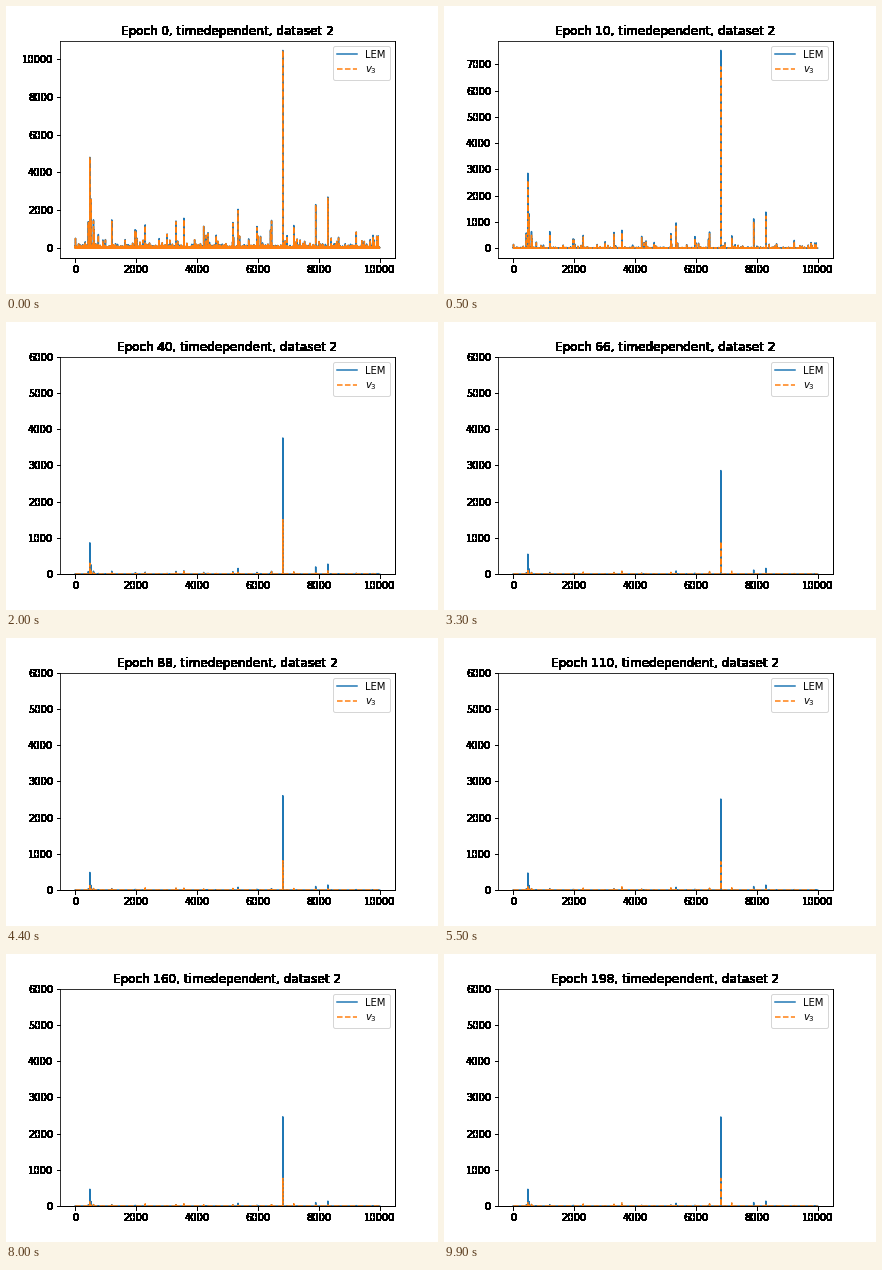
These frames come from a looping animation (432 px wide and 288 px high, 10 s). A matplotlib script:

```python
import numpy as np
import matplotlib.pyplot as plt
from matplotlib.animation import FuncAnimation

FRAMES, N = 100, 10000
TOP = 10450
TALL = {480: 4800, 520: 2600, 5350: 2050, 6820: TOP, 7900: 2300, 8300: 2700}
MID = [430, 600, 1200, 2300, 3310, 3570, 4220, 5180, 6450, 7180]

# Starting heights: noise floor, scattered small spikes, then the main ones
rng = np.random.default_rng(3)
start = rng.lognormal(2.6, 1.1, N)
start[rng.integers(0, N, 30)] = rng.uniform(350, 1000, 30)
start[MID] = rng.uniform(1150, 1650, len(MID))
start[list(TALL)] = list(TALL.values())

size = start / TOP
floor = .235 * size ** 1.15
tau = 22 * size ** .35
shortfall = 1 - .1 * rng.random(N) * (1 - size) ** 4
linger = rng.uniform(40, 95, len(MID))


def solid_heights(epoch):
    """Exponential decay; taller spikes fade slower and keep more."""
    return start * (floor + (1 - floor) * np.exp(-epoch / tau))


def dashed_heights(epoch, solid):
    """A shrinking share of the solid curve, with a few restless spikes."""
    low = .2 + .11 * size
    share = low + (1 - low) * np.exp(-(epoch / 28) ** 2)
    heights = solid * share * shortfall
    jitter = np.random.default_rng(epoch).uniform(.5, 1.1, len(MID))
    rest = linger * jitter * (1 - np.exp(-epoch / 25))
    heights[MID] = np.maximum(heights[MID], rest)
    return heights


def harden(img, dpi):
    """Turn every touched pixel solid black."""
    out = np.zeros_like(img)
    out[..., 3] = img[..., 3] > 0
    return out, 0, 0


plt.rcParams["font.family"] = "DejaVu Sans"
fig = plt.figure(figsize=(6, 4), dpi=72, facecolor="white")
ax = fig.add_axes([.125, .125, .775, .755])
ax.set_xlim(-.05 * (N - 1), 1.05 * (N - 1))
for part in (ax.xaxis, ax.yaxis, ax.title,
             ax.spines["bottom"], ax.spines["right"]):
    part.set_agg_filter(harden)

xs = np.arange(N)
lem, = ax.plot(xs, start, label="LEM")
v3, = ax.plot(xs, start, "--", label="$v_3$")
ax.legend(loc="upper right")


def update(frame):
    epoch = 2 * frame
    solid = solid_heights(epoch)
    lem.set_ydata(solid)
    v3.set_ydata(dashed_heights(epoch, solid))
    if epoch < 20:
        peak = solid.max()
        ax.set_ylim(-.05 * peak, 1.05 * peak)
    else:
        ax.set_ylim(0, 6000)
    ax.set_title(f"Epoch {epoch}, timedependent, dataset 2")
    return lem, v3


anim = FuncAnimation(fig, update, frames=FRAMES, interval=1000 // 10,
                     repeat=True, repeat_delay=0, blit=False)
plt.show()
```
